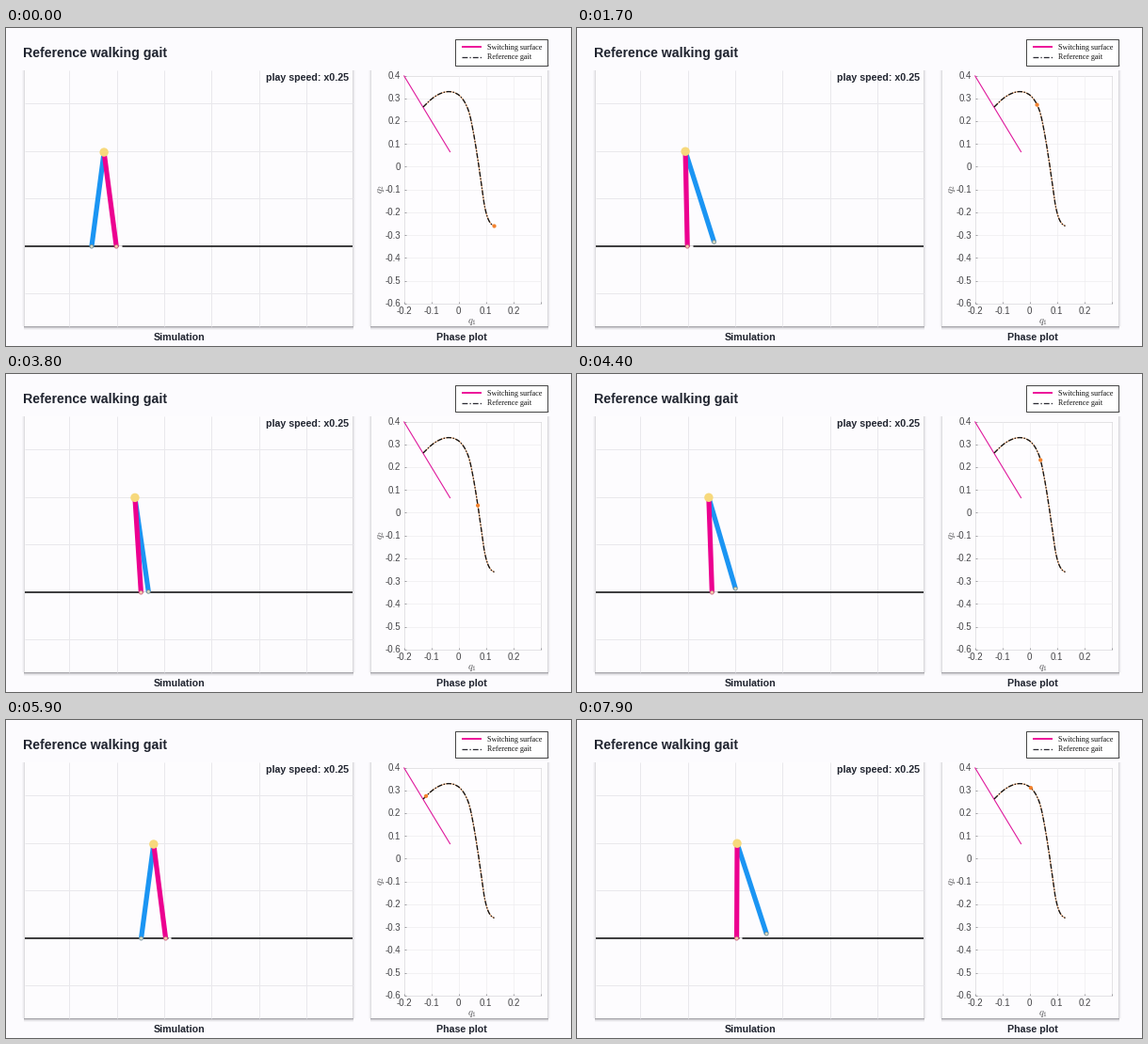
Write a matplotlib script that moves like this. It is 600x338 px and loops after 8 s.

```python
import numpy as np
import matplotlib.pyplot as plt
from matplotlib.animation import FuncAnimation
from matplotlib.patches import Circle, Rectangle

W, H, DPI = 600, 338, 100
FRAMES, DT = 80, 100
PT = 72 / DPI  # points per pixel

INK, BG = "#20242f", "#fcfbfe"
MAGENTA, BLUE, ORANGE, YELLOW = "#ec0090", "#1b95f3", "#f2822e", "#f7d97c"

GROUND, LEG, FOOT0 = 232.2, 101.0, 117.2
STEP_MS = 2930

plt.rcParams["mathtext.fontset"] = "cm"
fig = plt.figure(figsize=(W / DPI, H / DPI), dpi=DPI, facecolor=BG)
ax = fig.add_axes([0, 0, 1, 1])
ax.set_xlim(0, W)
ax.set_ylim(H, 0)
ax.axis("off")


def line(xs, ys, color, width, **kw):
    kw.setdefault("solid_capstyle", "butt")
    return ax.plot(xs, ys, color=color, lw=width * PT, **kw)[0]


def text(x, y, s, size, family="Liberation Sans", color=INK, **kw):
    kw.setdefault("va", "baseline")
    return ax.text(x, y, s, fontsize=size * PT, family=family, color=color, **kw)


def rect(x0, y0, x1, y1, **kw):
    kw.setdefault("lw", 0)
    ax.add_patch(Rectangle((x0, y0), x1 - x0, y1 - y0, **kw))


def dot(r, face, edge="none", width=0.0, z=6):
    return ax.add_patch(Circle((0, 0), r, fc=face, ec=edge, lw=width * PT, zorder=z))


def hermite(x, xs, ys):
    """Smooth cubic interpolation through a few points."""
    m = np.gradient(ys, xs)
    i = np.clip(np.searchsorted(xs, x, side="right") - 1, 0, len(xs) - 2)
    h = xs[i + 1] - xs[i]
    u = (x - xs[i]) / h
    return ((1 + 2 * u) * (1 - u) ** 2 * ys[i] + u * (1 - u) ** 2 * h * m[i]
            + u * u * (3 - 2 * u) * ys[i + 1] + u * u * (u - 1) * h * m[i + 1])


# Phase plot coordinates
def px(q1):
    return 480.7 + 291 * q1


def py(q2):
    return 147.4 - 242.2 * q2


CURVE = np.array([
    (443, 84), (449, 78), (456, 72.5), (463, 69), (470, 67.6), (477, 69),
    (483, 73.2), (488.5, 81.5), (492, 90.5), (496, 109), (500.5, 136),
    (505, 167), (508, 188), (510, 197), (512, 203), (515, 208), (518.5, 210.5)])
Q1S = (CURVE[:, 0] - 480.7) / 291
Q2S = (147.4 - CURVE[:, 1]) / 242.2

# Stance angle over one step
TAU = np.array([0, 770, 1600, 1990, 2600, 2870, STEP_MS], float)
ANGLE = np.array([0.13, 0.07, 0.027, 0, -0.077, -0.119, -0.1295])


def state(t):
    """Step index, stance angle and leg opening at time t."""
    k, tau = divmod(max(t, 0), STEP_MS)
    q1 = hermite(tau, TAU, ANGLE)
    return int(k), q1, hermite(q1, Q1S, Q2S)


def panel(x0, y0, x1, y1):
    for i, a in enumerate((0.26, 0.11, 0.05)):
        rect(x0 - 1 - i, y0, x0 - i, y1, fc="#55555c", alpha=a * 0.7)
        rect(x1 + i, y0, x1 + 1 + i, y1, fc="#55555c", alpha=a * 0.8)
    for i, a in enumerate((0.5, 0.28, 0.12, 0.05)):
        rect(x0 - 1, y1 + i, x1 + 1, y1 + 1 + i, fc="#55555c", alpha=a)
    rect(x0, y0, x1, y1, fc="#fdfcfe")


def draw_simulation():
    panel(20, 45, 368, 317)
    for i in range(6):
        line([67.4 + 50.3 * i] * 2, [45, 317], "#e9e8ec", 1)
    for y in (80.4, 131, 181.4, 282.4):
        line([20, 368], [y, y], "#e9e8ec", 1)
    line([20, 368], [GROUND] * 2, "#111111", 1.6, zorder=2.5)
    text(276, 56.2, "play speed: x0.25", 10.6, weight="bold")
    text(157, 332.4, "Simulation", 10.6, weight="bold")


def draw_phase():
    panel(388, 45, 575, 317)
    x0, x1, y0, y1 = px(-0.2), px(0.3), py(0.4), py(-0.6)
    rect(x0, y0, x1, y1, fc="#fefdff")
    tick = dict(size=9.8, color="#454548")
    for i in range(-2, 4):
        x = px(i / 10)
        line([x, x], [y0, y1], "#efeef1", 0.8)
        line([x, x], [y1, y1 - 2], "#8c8c90", 0.8)
        if i < 3:
            text(x, 303.6, f"{i / 10:g}", ha="center", **tick)
    for i in range(-6, 5):
        y = py(i / 10)
        line([x0, x1], [y, y], "#efeef1", 0.8)
        line([x0, x0 + 2], [y, y], "#8c8c90", 0.8)
        text(x0 - 3, y + 3.5, f"{i / 10:g}", ha="right", **tick)
    rect(x0, y0, x1, y1, fc="none", ec="#a5a5a9", lw=0.8 * PT)
    text(494.5, 314, "$q_1$", 10.5, color="#555558", ha="center")
    text(398.5, 171, "$q_2$", 10.5, color="#555558", ha="center", va="center",
         rotation=90)
    line([x0, 471.8], [y0, 132], "#df189c", 1.1)
    q = np.linspace(Q1S[0], Q1S[-1], 300)
    curve = px(q), py(hermite(q, Q1S, Q2S))
    line(*curve, ORANGE, 1, alpha=0.65)
    line(*curve, "#151515", 1.35, ls=(0, (4, 1.2, 1, 1.2)), dash_capstyle="butt")
    text(457, 331.6, "Phase plot", 10.6, weight="bold")


def draw_legend():
    rect(478, 39, 576.5, 41, fc="#55555c", alpha=0.22)
    rect(476.5, 11.5, 574.5, 39.5, fc="white", ec="#333333", lw=0.9 * PT)
    line([484, 505], [20, 20], MAGENTA, 1.8)
    line([484, 505], [30.5, 30.5], "#2b2b33", 1.3, ls=(0, (4.5, 1.6, 1, 1.6)),
         dash_capstyle="butt")
    text(511, 23, "Switching surface", 8.1, "Liberation Serif", "#111111")
    text(511, 33.3, "Reference gait", 8.1, "Liberation Serif", "#111111")


text(18.5, 31, "Reference walking gait", 14.1, weight="bold")
draw_simulation()
draw_phase()
draw_legend()

gap = line([], [], "#fdfcfe", 2.6, zorder=3)
swing = line([], [], BLUE, 5.2, zorder=4)
stance = line([], [], MAGENTA, 5.2, zorder=5)
swing_foot = dot(1.9, "#d9dcc0", "#6f8d9c", 0.8)
stance_foot = dot(1.9, "#f5cfae", "#c9607f", 0.8)
hip = dot(4.7, YELLOW, z=7)
marker = dot(2.1, ORANGE, z=8)


def update(n):
    t = n * DT
    k, q1, q2 = state(t)
    fx = FOOT0 + k * 2 * LEG * np.sin(0.13)
    hx, hy = fx - LEG * np.sin(q1), GROUND - LEG * np.cos(q1)
    sx, sy = hx + LEG * np.sin(q1 + q2), hy + LEG * np.cos(q1 + q2)
    sy = min(sy, GROUND)
    stance.set_data([hx, fx], [hy, GROUND])
    swing.set_data([hx, sx], [hy, sy])
    gap.set_data([fx + 2, fx + 5.5], [GROUND, GROUND])
    hip.center = hx, hy
    stance_foot.center = fx, GROUND
    swing_foot.center = sx, sy
    _, p1, p2 = state(t - DT)  # the plot trails the walker by one tick
    marker.center = px(p1), py(p2)
    return gap, swing, stance, swing_foot, stance_foot, hip, marker


anim = FuncAnimation(fig, update, frames=FRAMES, interval=DT, repeat=True,
                     repeat_delay=0, blit=False)
plt.show()
```
